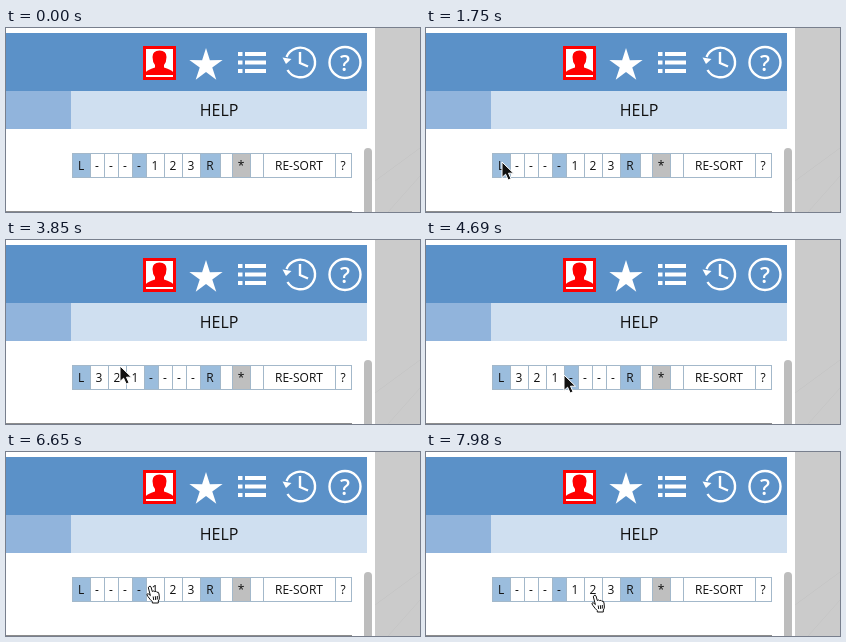
Animation, 414 px wide and 184 px high, one loop 8000 ms. Source, as an HTML page:

```html
<!DOCTYPE html>
<html lang="en">
<head>
<meta charset="utf-8">
<style>
html, body { margin: 0; width: 100%; height: 100%; overflow: hidden; background: #fff; }
svg { display: block; width: 414px; height: 184px; }
text { font: 12px "Open Sans", sans-serif; text-anchor: middle; fill: #111; }
.line { fill: none; stroke: #fff; stroke-width: 2.4; }
#cells rect { stroke: #a3b8ca; stroke-width: 1; }
</style>
</head>
<body>
<svg viewBox="0 0 414 184">
  <rect width="414" height="184" fill="#fff"/>
  <rect x="369" width="45" height="184" fill="#cbcbcb"/>
  <path d="M369 153L414 120M382 184L414 148" stroke="#c6c6c6" fill="none"/>
  <rect y="5" width="361" height="58" fill="#5b91c8"/>
  <rect y="63" width="65" height="38" fill="#91b4dc"/>
  <rect x="65" y="63" width="296" height="38" fill="#cfdff0"/>
  <text x="213" y="88" style="font-size:16px">HELP</text>

  <rect x="138.5" y="19.5" width="30" height="31" fill="#fff" stroke="#f00" stroke-width="3"/>
  <path d="M140 47V44Q141 42 149 39.5V37Q146.500 34 146.500 29Q146.500 22.500 153.500 22.500Q160.500 22.500 160.500 29Q160.500 34 158 37V39.500Q166 42 167 44V47Z" fill="#f00"/>
  <path id="star" fill="#fff"/>
  <path d="M232 26h4.500m2.500 0h21M232 34.500h4.500m2.500 0h21M232 43h4.500m2.500 0h21" class="line" style="stroke-width:4"/>
  <path d="M280.500 29A14.800 14.800 0 1 1 281.500 42M294 24V35L302 38.500" class="line"/>
  <path d="M276.500 29.500L280 36L285.500 31Z" fill="#fff"/>
  <circle cx="339" cy="34.500" r="15.500" class="line"/>
  <text x="339" y="42.500" style="font-size:22px;font-weight:600;fill:#fff">?</text>

  <path d="M0 183.500H346" stroke="#8c8c8c"/>
  <path d="M358 184V124a4 4 0 0 1 8 0V184Z" fill="#bdbdbd"/>
  <g id="cells"></g>
  <g id="arrow">
    <path d="M0 0V15.500L3.600 12.200L6.200 18L9 16.700L6.500 11.200H11.500Z" fill="#111" stroke="#fff"/>
  </g>
  <g id="hand">
    <path transform="translate(-4 -1)" d="M3 1.600Q4.400 .4 5 2L6.300 6.500Q8 5.400 8.600 6.600Q10.200 5.700 10.800 7.200Q12.800 6.600 13 9L13.400 13Q13.200 15 12.300 16V18H6.300V16.600Q4 14.500 2 11.600Q.2 9.400 1.400 8.800Q2.600 8.400 4.400 10.600L2.400 3Q2.200 2 3 1.600ZM7.200 11.500L7.700 15M9.300 11.200L9.700 15M11.300 11V14.500" fill="#fff" stroke="#111"/>
  </g>
</svg>
<script>
const $ = id => document.getElementById(id);
const LOOP = 8000, STEP = 70;
const LEFT_CLICK = 2030, RIGHT_CLICK = 6090;

// Pointer stops: time, x, y
const stops = [
  [910, 94, 190], [1750, 76, 134], [2520, 76, 134], [2800, 91, 133],
  [3290, 92, 134], [3850, 114, 126], [4200, 126, 134], [4690, 138, 135],
  [5040, 160, 136], [5670, 204, 136], [6300, 204, 136], [6650, 144, 134],
  [7350, 146, 135], [7980, 169, 143], [8000, 169, 143]
];

const starPoints = Array.from({ length: 10 }, (_, i) => {
  const r = i % 2 ? 6.6 : 17.5, a = i * Math.PI / 5;
  return `${200 + r * Math.sin(a)} ${37.5 - r * Math.cos(a)}`;
});
$("star").setAttribute("d", `M${starPoints.join("L")}Z`);

function cellsFor(labels) {
  const blue = "#9bbddd";
  let x = 66;
  const cell = (label, width, fill = "#fff") => {
    const box = { label, x, width, fill };
    x += width;
    return box;
  };
  return [
    cell("L", 18, blue),
    ...[...labels].map((c, i) => cell(c, c === "-" ? 14 : 18, i === 3 ? blue : "#fff")),
    cell("R", 20, blue), cell("", 12), cell("*", 18, "#bfbfbf"),
    cell("", 13), cell("RE-SORT", 72), cell("?", 16)
  ];
}

let shown = "", cells = [];
function showCells(labels) {
  if (labels === shown) return;
  shown = labels;
  cells = cellsFor(labels);
  $("cells").innerHTML = cells.map(c =>
    `<rect x="${c.x + .5}" y="125.5" width="${c.width}" height="24" fill="${c.fill}"/>` +
    `<text x="${c.x + c.width / 2}" y="142">${c.label}</text>`).join("");
}

function pointerAt(t) {
  const i = stops.findIndex(s => s[0] > t);
  if (i < 1) return null;
  const [t0, x0, y0] = stops[i - 1], [t1, x1, y1] = stops[i];
  const p = (t - t0) / (t1 - t0), e = p * p * (3 - 2 * p);
  return [x0 + (x1 - x0) * e, y0 + (y1 - y0) * e];
}

function draw(now) {
  const t = Math.floor(now % LOOP / STEP) * STEP;
  showCells(t >= LEFT_CLICK && t < RIGHT_CLICK ? "321----" : "----123");
  const pos = pointerAt(t);
  const overDigit = pos && pos[1] > 127 && cells.some(c =>
    /\d/.test(c.label) && pos[0] > c.x && pos[0] < c.x + c.width);
  for (const id of ["arrow", "hand"]) {
    const visible = pos && (id === "hand") === overDigit;
    $(id).style.display = visible ? "" : "none";
    if (visible) $(id).setAttribute("transform", `translate(${pos})`);
  }
}

const start = performance.now();
function tick() {
  draw(performance.now() - start);
  requestAnimationFrame(tick);
}
tick();
</script>
</body>
</html>
```
